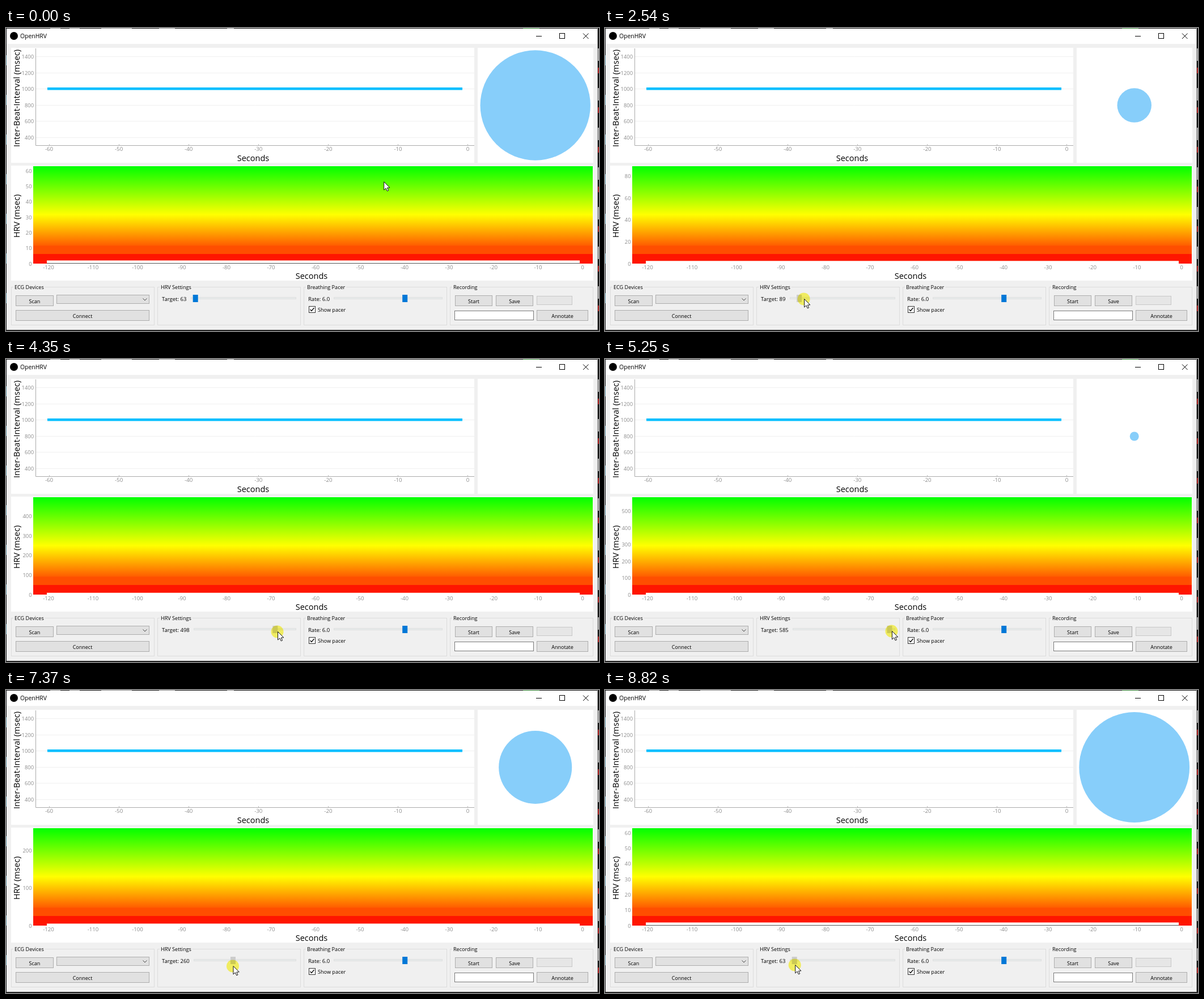
Write an HTML page with a canvas that moves like this. It is 1046x535 px and loops after 8.87 s.

```html
<!DOCTYPE html>
<html lang="en">
<head>
<meta charset="utf-8">
<title>OpenHRV</title>
<style>
html, body { margin: 0; width: 100%; height: 100%; overflow: hidden; background: #f0f0f0; }
canvas { display: block; }
</style>
</head>
<body>
<canvas id="stage" width="1046" height="535"></canvas>
<script>
const ctx = document.getElementById('stage').getContext('2d');
const LOOP = 8870;
const FONT = '"Open Sans", "Noto Sans", sans-serif';
const GRAY = '#8c8c8c', INK = '#000';

// [time, value] keys
const BREATH = [[0, .12], [1040, .915], [1920, 1.576], [2540, 1.96], [2830, 2.15], [3440, 2.542],
  [3770, 2.76], [5250, 3.722], [5570, 3.874], [6460, 4.459], [7370, 5.041], [8290, 5.74], [8820, 6.22], [8870, 6.25]];
const TARGET = [[0, 63], [2300, 63], [2540, 89], [2830, 145], [3440, 315], [4300, 490], [5000, 578],
  [5250, 585], [5550, 585], [6460, 432], [7370, 260], [8290, 101], [8700, 63], [8870, 63]];
const POINTER_X = [[0, 332], [190, 330], [400, 268], [600, 184], [800, 99], [950, 64], [1040, 49],
  [1500, 13], [1920, 6], [2300, 7], [2540, 7], [3440, 4.5], [5250, 4], [5700, 1], [7370, 0], [8820, 1]];
const POINTER_Y = [[0, 271], [190, 273], [400, 303], [600, 355], [800, 393], [950, 415], [1040, 427],
  [1500, 465], [1920, 477], [2540, 478], [3440, 482], [5250, 480], [5900, 487], [7370, 487], [8820, 485]];
const PRESS = 2250;

// monotone cubic interpolation through the keys
function track(keys, t) {
  const n = keys.length;
  if (t <= keys[0][0]) return keys[0][1];
  if (t >= keys[n - 1][0]) return keys[n - 1][1];
  let i = 0;
  while (t >= keys[i + 1][0]) i++;
  const slope = k => (keys[k + 1][1] - keys[k][1]) / (keys[k + 1][0] - keys[k][0]);
  const tangent = k => {
    if (k === 0) return slope(0);
    if (k === n - 1) return slope(n - 2);
    const a = slope(k - 1), b = slope(k);
    return a * b <= 0 ? 0 : 2 * a * b / (a + b);
  };
  const [t0, v0] = keys[i], [t1, v1] = keys[i + 1];
  const h = t1 - t0, u = (t - t0) / h, w = 1 - u;
  return v0 * (1 + 2 * u) * w * w + v1 * u * u * (3 - 2 * u)
    + h * u * w * (tangent(i) * w - tangent(i + 1) * u);
}

function rect(x0, y0, x1, y1, color) {
  ctx.fillStyle = color;
  ctx.fillRect(x0, y0, x1 - x0, y1 - y0);
}

function box(x0, y0, x1, y1, fill, border) {
  rect(x0, y0, x1, y1, border);
  rect(x0 + 1, y0 + 1, x1 - 1, y1 - 1, fill);
}

function text(s, x, y, size = 9.1, color = INK, align = 'left') {
  ctx.font = `${size}px ${FONT}`;
  ctx.textAlign = align;
  ctx.fillStyle = color;
  ctx.fillText(s, x, y);
}

function sideText(s, x, y) {
  ctx.save();
  ctx.translate(x, y);
  ctx.rotate(-Math.PI / 2);
  text(s, 0, 0, 14.6, INK, 'center');
  ctx.restore();
}

function line(points, color, width = 1) {
  ctx.beginPath();
  points.forEach(([x, y]) => ctx.lineTo(x, y));
  ctx.strokeStyle = color;
  ctx.lineWidth = width;
  ctx.stroke();
}

function disc(x, y, r, color) {
  ctx.beginPath();
  ctx.arc(x, y, Math.max(r, 0), 0, 7);
  ctx.fillStyle = color;
  ctx.fill();
}

function button(label, x0, y0, x1, y1) {
  box(x0, y0, x1, y1, '#e1e1e1', '#adadad');
  text(label, (x0 + x1) / 2, (y0 + y1) / 2 + 4, 9, INK, 'center');
}

function slider(x0, x1, pos, color) {
  box(x0, 475, x1, 479, '#e7eaea', '#dfe0e0');
  rect(pos - 4.5, 471, pos + 4.5, 484, color);
}

function group(title, x0, x1) {
  ctx.strokeStyle = '#dcdcdc';
  ctx.lineWidth = 1;
  ctx.strokeRect(x0 + .5, 457.5, x1 - x0 - 1, 67);
  ctx.font = `9.1px ${FONT}`;
  rect(x0 + 4, 455, x0 + 8 + ctx.measureText(title).width, 460, '#f0f0f0');
  text(title, x0 + 6, 461);
}

function windowFrame() {
  rect(0, 0, 1046, 535, '#f0f0f0');
  rect(1, 1, 1043, 28, '#fff');
  rect(0, 0, 1046, 1, '#111');
  rect(0, 0, 1, 535, '#16181c');
  rect(1043, 0, 1044, 535, '#999');
  rect(1044, 0, 1046, 535, '#111');
  rect(0, 533, 1046, 535, '#222');
  [[78, 96], [112, 130], [168, 222], [270, 298], [390, 402]].forEach(([a, b]) => rect(a, 0, b, 1, '#999'));
  rect(912, 0, 941, 1, '#3a8a3a');
  for (let y = 36; y < 520; y += 70) {
    rect(1044, y, 1046, y + 22, '#aaa');
    rect(1044, y + 34, 1046, y + 44, '#a22');
    rect(0, y + 12, 1, y + 30, '#69a');
  }
  disc(14, 14, 7, INK);
  text('OpenHRV', 25, 18, 10.4);
  line([[935, 14.5], [945, 14.5]], INK);
  ctx.strokeRect(976.5, 9.5, 9, 9);
  line([[1018, 9.5], [1027.5, 19]], INK);
  line([[1018, 19], [1027.5, 9.5]], INK);
}

function intervalChart() {
  rect(9, 35, 826, 238, '#fff');
  for (let i = 0; i < 6; i++) {
    const y = Math.round(50 + i * 28.6) + .5;
    line([[53, y], [826, y]], '#f0f0f0');
    text(1400 - i * 200, 49, y + 3.5, 9.4, GRAY, 'right');
  }
  line([[52.5, 36], [52.5, 207.5], [826, 207.5]], '#aaa');
  for (let i = 0; i < 7; i++) {
    const x = 76 + i * 123.1;
    line([[Math.floor(x) + .5, 205], [Math.floor(x) + .5, 207]], '#bbb');
    text(i * 10 - 60, x, 217, 9.7, GRAY, 'center');
  }
  rect(73, 105, 805, 109.5, '#00bfff');
  text('Seconds', 436, 235, 14.5, INK, 'center');
  sideText('Inter-Beat-Interval (msec)', 24, 124);
}

function hrvChart(v) {
  const top = 243.5, base = 415.5, high = base - top;
  rect(9, 243, 1036, 446, '#fff');
  const g = ctx.createLinearGradient(0, top, 0, base);
  g.addColorStop(0, '#0f0');
  g.addColorStop(.5, '#ff0');
  g.addColorStop(1, '#f00');
  rect(48, 244, 1035, 416, g);
  rect(48, 384.5, 1035, 399, '#ff4e00');
  rect(48, 399, 1035, 416, '#ff1600');
  rect(72, 413.1 - 165 / v, 1012, 416, '#fff');
  if (v < 70) rect(72, 415, 1012, 416, '#555');

  const step = v < 75 ? 10 : v < 140 ? 20 : 100;
  for (let n = 0; n <= v * .985; n += step)
    text(n, 45.5, base - n / v * high + 4, 9.4, GRAY, 'right');
  for (let i = 0; i < 13; i++)
    text(i * 10 - 120, 75 + i * 78.5, 425.5, 9.7, GRAY, 'center');
  text('Seconds', 539, 443, 14.5, INK, 'center');
  sideText('HRV (msec)', 24, 332);
}

function controls(v, handle, pressed) {
  group('ECG Devices', 9, 262);
  button('Scan', 17, 472, 84, 491);
  box(89, 471, 253, 487, '#e1e1e1', '#adadad');
  line([[241.5, 477.5], [245, 481], [248.5, 477.5]], '#444');
  button('Connect', 17, 498, 253, 517);

  group('HRV Settings', 267, 520);
  text('Target: ' + Math.round(v), 275, 482, 9.5);
  slider(v >= 99.5 ? 331 : 326, 512, handle, pressed ? '#ccc' : '#0078d7');

  group('Breathing Pacer', 525, 778);
  text('Rate: 6.0', 533, 482, 9.5);
  slider(578, 770, 703.7, '#0078d7');
  box(534, 491, 546, 503, '#fff', '#333');
  line([[536.5, 497], [539, 499.5], [543.5, 494]], INK, 1.2);
  text('Show pacer', 550, 500.5);

  group('Recording', 783, 1036);
  button('Start', 792, 472, 858, 491);
  button('Save', 864, 472, 930, 491);
  box(936, 473, 999, 489, '#e6e6e6', '#c8c8c8');
  box(791, 499, 931, 516, '#fff', '#7a7a7a');
  button('Annotate', 936, 498, 1027, 517);
}

function pointer(x, y) {
  ctx.beginPath();
  [[0, 0], [0, 14.5], [3.4, 11.4], [5.7, 16.4], [8, 15.4], [5.8, 10.6], [10.3, 10.4]]
    .forEach(([dx, dy]) => ctx.lineTo(x + dx + .5, y + dy + .5));
  ctx.closePath();
  ctx.fillStyle = '#fff';
  ctx.fill();
  ctx.strokeStyle = '#111';
  ctx.lineWidth = 1;
  ctx.stroke();
}

function draw(t) {
  const v = track(TARGET, t);
  const pressed = t >= PRESS;
  const place = left => left + (v - 50) / 550 * (506.6 - left);
  const handle = place(v >= 99.5 ? 335 : 330);
  const smooth = place(330 + 5 * Math.min(1, (v - 63) / 80));
  const px = smooth + track(POINTER_X, t), py = track(POINTER_Y, t);

  windowFrame();
  intervalChart();
  rect(832, 35, 1036, 238, '#fff');
  disc(933.7, 136.5, 97.5 * (1 + Math.cos(track(BREATH, t))) / 2, '#87cefa');
  hrvChart(v);
  controls(v, handle, pressed);
  if (t > 800 && t < 1300) {
    box(9, 438, 17, 446, '#333', '#888');
    text('A', 13, 445, 7, '#fff', 'center');
  }
  if (pressed) {
    ctx.globalCompositeOperation = 'multiply';
    disc(px - .5, py + .5, 11, 'rgba(255,250,60,.78)');
    ctx.globalCompositeOperation = 'source-over';
  }
  pointer(px, py);
}

const start = performance.now();
function tick() {
  draw((performance.now() - start) % LOOP);
  requestAnimationFrame(tick);
}
tick();
</script>
</body>
</html>
```
